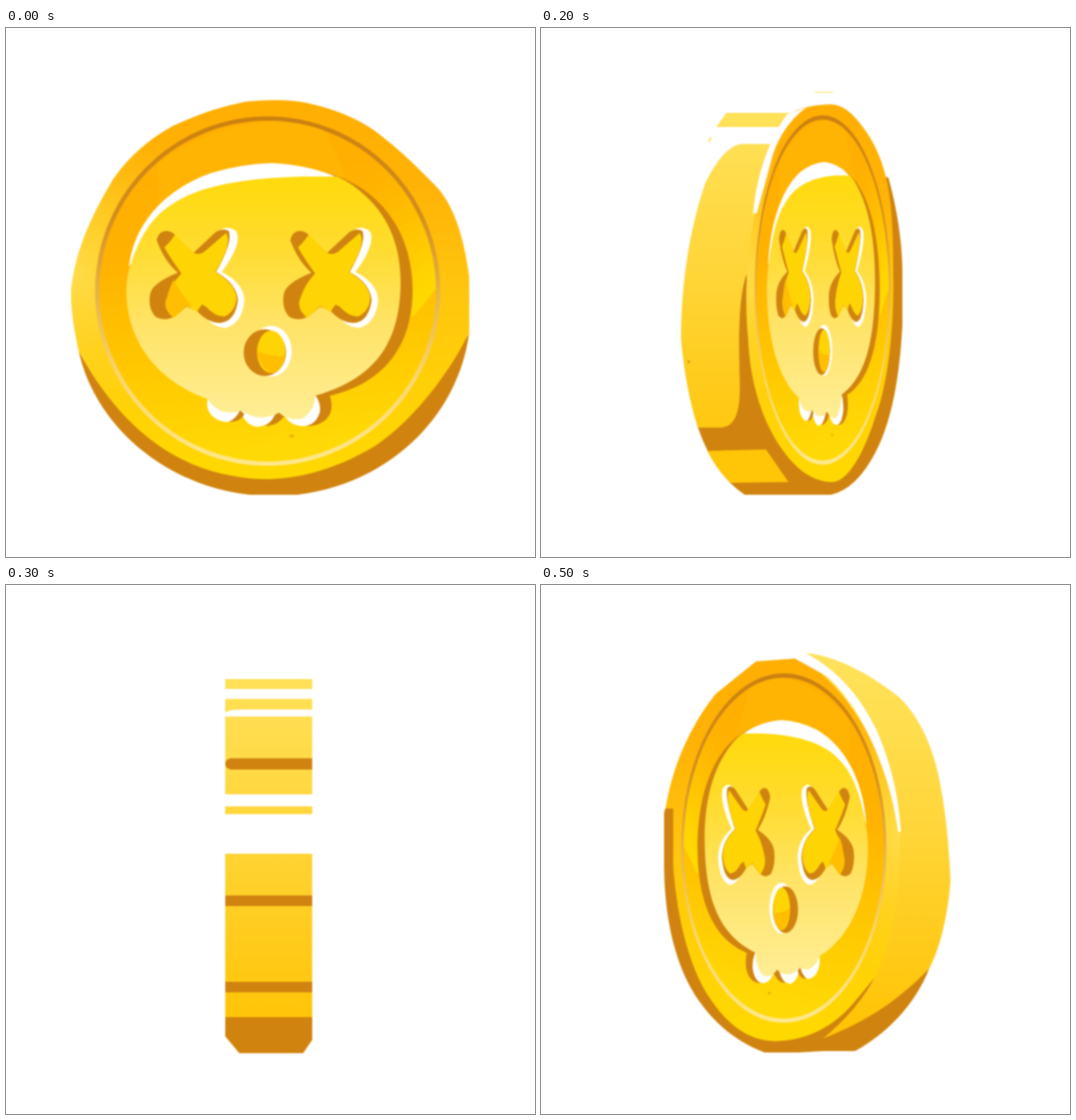
An HTML page that plays this animation: 748 px wide and 748 px high, repeating every 0.6 s.

```html
<!DOCTYPE html>
<html lang="en">
<head>
<meta charset="utf-8">
<title>Spinning coin</title>
<style>
  html, body { margin: 0; width: 100%; height: 100%; overflow: hidden; background: #fff; }
  svg { display: block; width: 100vw; height: 100vh; filter: blur(.9px); }
  .dark { fill: #d0840f; }
  .white { fill: #fff; }
  .gold { fill: #ffd405; }
  .amber { fill: #ffbe00; }
</style>
</head>
<body>
<svg viewBox="0 0 748 748">
  <defs>
    <linearGradient id="rim" x2="0" y2="1">
      <stop offset="0" stop-color="#ffaf02"/>
      <stop offset=".22" stop-color="#ffb206"/>
      <stop offset=".5" stop-color="#ffc60e"/>
      <stop offset="1" stop-color="#ffd900"/>
    </linearGradient>
    <radialGradient id="glow" cx="0" cy=".46" r=".4">
      <stop offset="0" stop-color="#ffdf50" stop-opacity=".9"/>
      <stop offset=".35" stop-color="#ffdb40" stop-opacity=".6"/>
      <stop offset="1" stop-color="#ffd520" stop-opacity="0"/>
    </radialGradient>
    <linearGradient id="dish" x2=".12" y2="1">
      <stop offset="0" stop-color="#ffad00"/>
      <stop offset=".4" stop-color="#ffb200"/>
      <stop offset=".7" stop-color="#ffc600"/>
      <stop offset="1" stop-color="#ffd905"/>
    </linearGradient>
    <linearGradient id="shine" x2=".5" y2="1">
      <stop offset=".15" stop-color="#ffc400" stop-opacity="0"/>
      <stop offset="1" stop-color="#ffd800"/>
    </linearGradient>
    <linearGradient id="groove" x2="0" y2="1">
      <stop offset="0" stop-color="#cc8010"/>
      <stop offset=".28" stop-color="#d48d1c"/>
      <stop offset=".52" stop-color="#e9b54a"/>
      <stop offset=".75" stop-color="#fbd670"/>
      <stop offset="1" stop-color="#ffe88c"/>
    </linearGradient>
    <linearGradient id="bone" x2="0" y2="1">
      <stop offset="0" stop-color="#ffda0c"/>
      <stop offset=".3" stop-color="#ffdc30"/>
      <stop offset=".6" stop-color="#ffe366"/>
      <stop offset="1" stop-color="#ffee96"/>
    </linearGradient>
    <linearGradient id="side" gradientUnits="userSpaceOnUse" x1="0" y1="110" x2="0" y2="620">
      <stop offset="0" stop-color="#ffe25a"/>
      <stop offset=".45" stop-color="#ffd63a"/>
      <stop offset="1" stop-color="#ffc406"/>
    </linearGradient>

    <g id="eye">
      <path class="white" d="M296 290Q313 276 326 288Q334 306 305 345Q337 361 337 386Q334 417 311 424Q292 424 276 402Z"/>
      <path class="dark" d="M213 300Q216 286 229 287Q236 288 241 295L265 318L296 289Q306 282 315 287Q321 303 297 345Q326 361 328 385Q324 415 303 417Q285 417 270 400L255 394L240 407Q225 416 211 408Q200 395 204 375Q208 360 243 346Q224 330 213 300Z"/>
      <path class="gold" d="M239 292L262 315Q271 324 282 315L311 290Q321 304 296 345Q325 362 326 383Q324 401 309 408Q295 408 283 394L277 391L270 401L255 393L237 410Q220 396 228 380Q234 362 248 347Q230 322 224 310Q232 303 239 292Z"/>
    </g>

    <!-- dish, groove and skull, shared by every visible side -->
    <g id="face">
      <ellipse cx="370" cy="372" rx="243" ry="245" fill="url(#dish)"/>
      <path d="M214 191V258Q260 215 320 198L480 210L450 140Q330 110 214 191Z" fill="#ffb808" opacity=".4"/>
      <path d="M470 205L530 190Q612 270 610 366L578 406L555 415Z" fill="url(#shine)"/>
      <ellipse cx="370" cy="372" rx="241" ry="244" fill="none" stroke="url(#groove)" stroke-width="6"/>
      <path class="dark" d="M430 200Q480 208 513 234C556 268 575 318 575 372C574 455 530 503 458 520Q466 545 448 557Q436 565 418 562L410 520Z"/>
      <path class="white" d="M174 337C180 285 215 232 290 205Q334 192 375 191Q428 193 470 212L460 260L230 275Z"/>
      <path class="white" d="M286 522Q281 538 292 549Q307 561 322 555L333 545Q340 562 355 564Q371 563 382 548L392 545Q400 562 420 563Q439 562 444 542Q445 530 438 520Z"/>
      <path class="dark" d="M337 546Q331 558 315 557Q326 552 331 540ZM394 548Q385 562 366 563Q378 556 383 540Z"/>
      <path d="M170 370C171 345 178 325 190 300C203 275 218 258 245 243C285 220 350 212 420 210H468Q490 219 512 241C542 270 558 310 558 360C557 444 524 495 437 520Q438 538 420 552Q401 557 386 544Q370 553 353 550Q341 547 333 541Q318 546 305 542Q290 535 286 525C215 500 170 444 170 370Z" fill="url(#bone)"/>
      <use href="#eye"/>
      <path class="amber" d="M237 356Q250 380 264 394L255 393L237 410Q220 396 228 380Q231 367 237 356Z"/>
      <use href="#eye" x="189"/>
      <ellipse class="white" cx="375" cy="457" rx="29" ry="36"/>
      <ellipse class="dark" cx="366" cy="459" rx="30" ry="33"/>
      <ellipse class="gold" cx="375" cy="458" rx="20" ry="30"/>
      <path class="amber" d="M355 457Q375 465 394 464Q388 488 375 488Q360 482 355 457Z"/>
      <ellipse cx="404" cy="577" rx="4" ry="2" fill="#f0b30a"/>
    </g>

    <path id="rim0" d="M92 375C96 315 125 258 152 213C175 180 205 155 237 138C275 121 300 112 340 104C375 101 405 101 430 107C475 117 510 135 530 152C560 175 590 205 612 228C640 262 650 315 655 352V432L650 440C622 495 570 560 520 592C470 622 420 637 370 638C240 636 160 560 103 458C97 430 92 400 92 375Z"/>
    <path id="rim1" d="M376 105H385L440 109L497 155C525 190 556 245 568 317H557V400C550 490 528 555 502 590C475 629 445 646 412 646C367 645 330 625 302 592L273 557C247 505 235 440 236 350C246 270 295 155 376 105Z"/>
    <path id="rim2" d="M350 122Q375 108 410 108Q432 108 455 140Q478 170 488 212C496 245 498 290 498 340C500 440 488 510 472 552C455 606 432 642 412 642C380 642 355 618 335 587C308 545 295 490 293 440C287 380 292 310 303 262Q318 170 350 122Z"/>

    <g id="front">
      <path class="dark" d="M655 430C640 550 540 645 412 660H345C240 650 130 575 103 458L370 560Z"/>
      <use href="#rim0" fill="url(#rim)"/>
      <use href="#rim0" fill="url(#glow)"/>
      <use href="#face"/>
    </g>

    <g id="turned">
      <path d="M370 97C330 101 285 122 237 160C205 192 188 237 180 280C172 320 167 370 165 420C169 470 180 515 195 543L230 590L300 650H345L420 600L385 105Z" fill="url(#side)"/>
      <path class="dark" d="M195 543C235 585 280 617 345 642C318 620 290 590 273 557L285 560L557 317H568L570 322V400C569 480 552 545 520 590C495 625 465 648 428 662H380L345 660H300C256 636 215 595 195 543Z"/>
      <use href="#rim1" fill="url(#rim)"/>
      <use href="#rim1" fill="url(#glow)"/>
      <path class="white" d="M370 97C318 125 290 165 270 205C250 250 238 300 235 350H239C246 300 258 265 275 225C295 180 318 150 340 130L385 105Z"/>
      <use href="#face" transform="translate(180.6 1) scale(.595 1)"/>
    </g>

    <g id="steep">
      <path d="M387 91H413" stroke="#ffed9a" stroke-width="2"/>
      <path d="M262 120H352L340 140H248ZM241 152L235 162L240 159ZM326 164H282Q256 170 232 220C208 290 198 370 198 440Q204 510 222 566L330 590V280Z" fill="url(#side)"/>
      <path class="dark" d="M290 350L470 250L484 211H491C505 260 511 310 511 345V420C507 500 494 560 473 600Q446 652 410 660H288Q244 630 222 565H254C276 564 282 540 281 500C279 430 280 380 290 350Z"/>
      <path d="M235 598L318 596L350 642L268 643Q249 625 235 598Z" fill="#ffc608"/>
      <use href="#rim2" fill="url(#rim)"/>
      <use href="#rim2" fill="url(#glow)"/>
      <path class="white" d="M348 122L376 112C350 130 332 160 325 190L305 262H300C304 215 320 160 348 122Z"/>
      <ellipse cx="209" cy="472" rx="2" ry="2" fill="#d99a10"/>
      <use href="#face" transform="translate(252.5 -1.5) scale(.394 1)"/>
    </g>

    <g id="edge">
      <path d="M310 133H433V643L420 662H330L310 638Z" fill="url(#side)"/>
      <path class="white" d="M310 147H433V161H310ZM310 180Q316 176 335 176H433V186H310ZM310 296H433V313H310ZM310 324H433V380H310Z"/>
      <path class="dark" d="M318 245H433V261H318Q310 259 310 253Q310 246 318 245ZM310 439H433V454H310ZM310 561H433V576H310ZM310 611H433V643L420 662H330L310 638Z"/>
    </g>
  </defs>
  <use id="coin" href="#front"/>
</svg>
<script>
  const coin = document.getElementById("coin");
  const mirror = (x, y) => `translate(${x} ${y}) scale(-1 1)`;
  const poses = [
    ["front", ""],
    ["turned", ""],
    ["steep", ""],
    ["edge", ""],
    ["steep", mirror(732, -2)],
    ["turned", mirror(744, -1)],
  ];
  let shown = 0;

  function draw() {
    const step = Math.floor(performance.now() / 100) % poses.length;
    if (step !== shown) {
      const [shape, transform] = poses[step];
      coin.setAttribute("href", "#" + shape);
      coin.setAttribute("transform", transform);
      shown = step;
    }
    requestAnimationFrame(draw);
  }
  draw();
</script>
</body>
</html>
```
